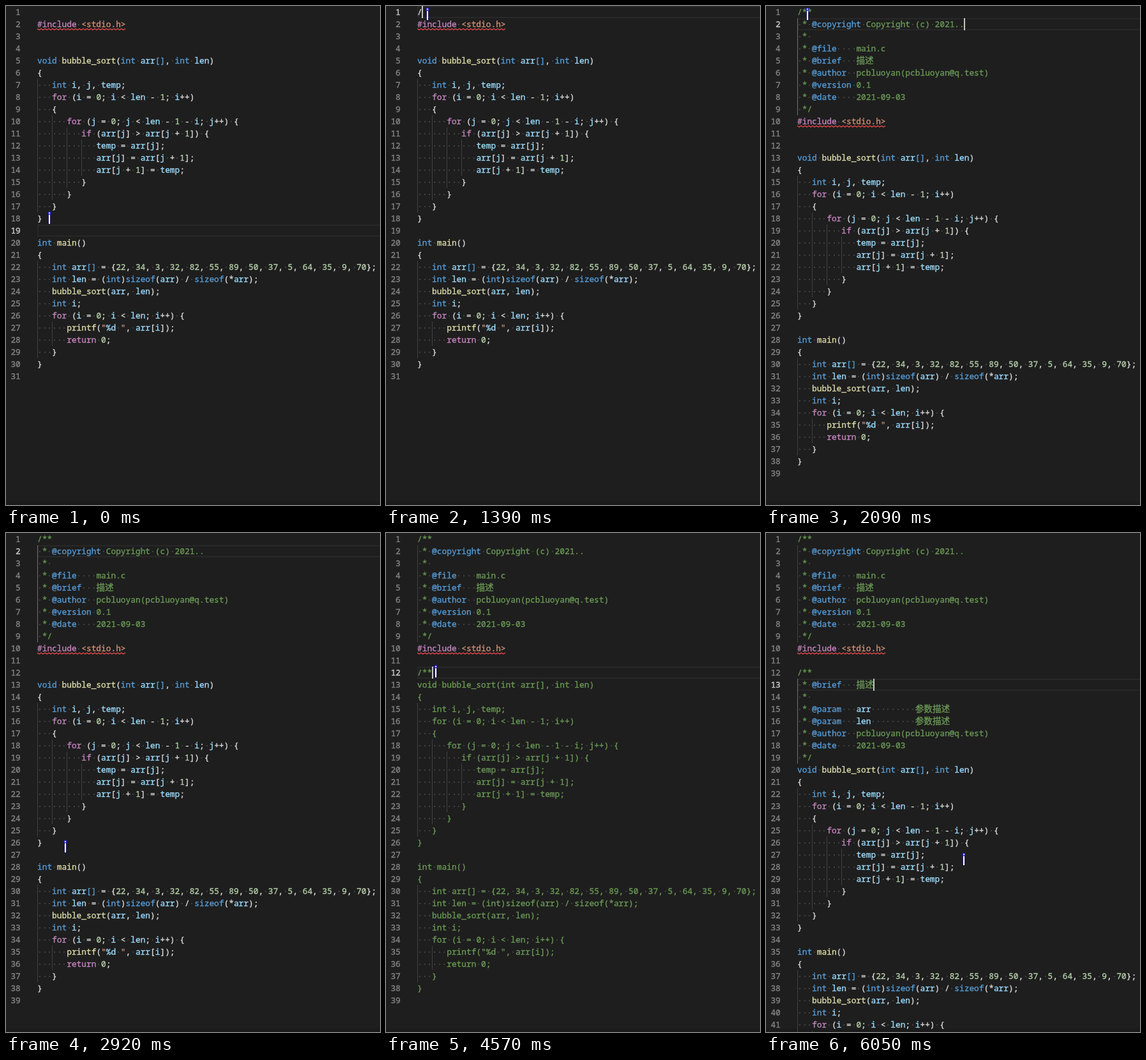
Recreate the animation shown at these times as an HTML page with a canvas. Size 586 by 781 pixels, loop 6510 ms.

```html
<!DOCTYPE html>
<html lang="en">
<head>
<meta charset="utf-8">
<title>Comment generator demo</title>
<style>
  html, body { margin: 0; width: 100%; height: 100%; overflow: hidden; background: #1e1e1e; }
  canvas { display: block; }
</style>
</head>
<body>
<canvas id="stage" width="586" height="781"></canvas>
<script>
const ctx = document.getElementById('stage').getContext('2d');
const W = 586, H = 781, LOOP = 6510;
const LEFT = 49, ROW = 19, CW = 7.698, BASE = 14, HAN_SIZE = 13.6;
const MONO = '12.83px "Noto Sans Mono", "DejaVu Sans Mono", monospace';
const HAN = HAN_SIZE + 'px "Noto Sans CJK SC", "Noto Sans CJK JP", sans-serif';
const BLINK_ON = 465, BLINK = 1000;

const C = {
  bg: '#1e1e1e', text: '#d9d9d9', key: '#569cd6', flow: '#c586c0', func: '#dcdcaa',
  name: '#9cdcfe', num: '#b5cea8', str: '#ce9178', note: '#6a9955',
  dot: '#404040', guide: '#404040', guideOn: '#707070', line: '#282828',
  no: '#858585', noOn: '#d0d0d0', caret: '#c4c5c3', error: '#f14c4c'
};

const BODY = `void bubble_sort(int arr[], int len)
{
   int i, j, temp;
   for (i = 0; i < len - 1; i++)
   {
      for (j = 0; j < len - 1 - i; j++) {
         if (arr[j] > arr[j + 1]) {
            temp = arr[j];
            arr[j] = arr[j + 1];
            arr[j + 1] = temp;
         }
      }
   }
}

int main()
{
   int arr[] = {22, 34, 3, 32, 82, 55, 89, 50, 37, 5, 64, 35, 9, 70};
   int len = (int)sizeof(arr) / sizeof(*arr);
   bubble_sort(arr, len);
   int i;
   for (i = 0; i < len; i++) {
      printf("%d ", arr[i]);
      return 0;
   }
}
`.split('\n');

const AUTHOR = 'pcbluoyan(pcbluoyan@q.test)';

// Two comments: click a row, type "/**", press enter, then the template expands.
// The code below takes the tint while the comment is still open.
const fileNote = {
  row: 0, click: 850, keys: [1390, 1620, 1770, 2000, 2090], tint: 'named',
  doc: `/**
 * @copyright Copyright (c) 2021..
 * 
 * @file    main.c
 * @brief   描述
 * @author  ${AUTHOR}
 * @version 0.1
 * @date    2021-09-03
 */`.split('\n')
};
const funcNote = {
  row: 11, click: 3620, keys: [4330, 4480, 4560, 4950, 5040], tint: 'note',
  doc: `/**
 * @brief   描述
 * 
 * @param   arr         参数描述
 * @param   len         参数描述
 * @author  ${AUTHOR}
 * @date    2021-09-03
 */`.split('\n')
};

// Stops of the pointer: time, x, y
const STOPS = [
  [0, 68, 324], [250, 26, 468], [620, 67, 7], [930, 65, 5], [2570, 65, 5],
  [2930, 93, 484], [3390, 78, 209], [5760, 78, 209], [6050, 310, 503]
];

const stage = (note, t) => note.keys.filter(k => k <= t).length;
const isOpen = (note, t) => stage(note, t) > 1 && stage(note, t) < 5;
const isHan = ch => ch >= '\u4e00' && ch <= '\u9fff';
const columns = s => [...s].reduce((n, ch) => n + (isHan(ch) ? HAN_SIZE / CW : 1), 0);
const indent = s => s.search(/\S|$/);
const rows = (texts, mode) => texts.map(text => ({ text, mode }));

function noteRows(note, t) {
  const n = stage(note, t);
  if (n === 5) return rows(note.doc, 'doc');
  const top = rows(['/**'.slice(0, n)], n > 1 ? 'doc' : 'plain');
  return n === 4 ? [...top, ...rows([' * '], 'plain')] : top;
}

function page(t) {
  const upper = isOpen(fileNote, t) ? fileNote.tint : 'code';
  const lower = isOpen(funcNote, t) ? funcNote.tint : upper;
  return [
    ...noteRows(fileNote, t),
    ...rows(['#include <stdio.h>', ''], upper),
    ...noteRows(funcNote, t),
    ...rows(BODY, lower)
  ];
}

// Each click or key restarts the blinking.
function caretAt(t) {
  if (t < fileNote.click) return { row: 18, col: 0, on: t > BLINK_ON };
  const note = t < funcNote.click ? fileNote : funcNote;
  const n = stage(note, t);
  const since = t - [note.click, ...note.keys][n];
  return {
    row: note.row + (n > 3 ? 1 : 0),
    col: n === 5 ? columns(note.doc[1]) : Math.min(n, 3),
    on: since % BLINK < BLINK_ON
  };
}

function mouseAt(t) {
  const next = STOPS.findIndex(s => s[0] > t);
  if (next < 0) return STOPS[STOPS.length - 1].slice(1);
  const [t0, x0, y0] = STOPS[next - 1], [t1, x1, y1] = STOPS[next];
  const u = (t - t0) / (t1 - t0), e = u * u * (3 - 2 * u);
  return [x0 + (x1 - x0) * e, y0 + (y1 - y0) * e];
}

const TOKEN = /#include|<stdio\.h>|"|%d|\[\]|[A-Za-z_]\w*|\d+|\S/g;
const DOC_TOKEN = /[\u4e00-\u9fff]+|[^\s\u4e00-\u9fff]+/g;

function codeColor(s) {
  if (/^(#include|for|if|return)$/.test(s)) return C.flow;
  if (/^(void|int|sizeof|\[\])$/.test(s)) return C.key;
  if (/^(bubble_sort|main|printf)$/.test(s)) return C.func;
  if (/^(<stdio\.h>|")$/.test(s)) return C.str;
  if (/^\d/.test(s)) return C.num;
  return /^(%d|\w+)$/.test(s) ? C.name : C.text;
}

function docColor(s) {
  if (s[0] === '@') return C.key;
  return /^(arr|len)$/.test(s) ? C.name : C.note;
}

function namedColor(s) {
  const c = codeColor(s);
  return s !== '%d' && (c === C.name || c === C.func) ? c : C.note;
}

const PAINT = {
  code: codeColor, doc: docColor, named: namedColor,
  note: () => C.note, plain: () => C.text
};

function rect(x, y, w, h, color) {
  ctx.fillStyle = color;
  ctx.fillRect(x, y, w, h);
}

function disc(x, y, r, color) {
  ctx.fillStyle = color;
  ctx.beginPath();
  ctx.arc(x, y, r, 0, Math.PI * 2);
  ctx.fill();
}

// A hairline outline gives the small type its full brightness.
function write(s, x, y, color, font = MONO) {
  ctx.font = font;
  ctx.fillStyle = ctx.strokeStyle = color;
  ctx.lineWidth = 0.35;
  ctx.fillText(s, x, y);
  ctx.strokeText(s, x, y);
}

function squiggle(y, width) {
  ctx.strokeStyle = C.error;
  ctx.lineWidth = 1.2;
  ctx.beginPath();
  for (let x = 0; x <= width; x += 3) ctx.lineTo(LEFT + x, y + (x % 6 ? 2.5 : 0.5));
  ctx.stroke();
}

function drawRow({ text, mode }, i, active, lit) {
  const y = i * ROW;
  ctx.textAlign = 'right';
  write(i + 1, 22.8, y + BASE, i === active ? C.noOn : C.no);
  ctx.textAlign = 'left';

  for (let g = 0; g < indent(text); g += 3) {
    rect(Math.floor(LEFT + g * CW), y, 1, ROW, lit && g === 0 ? C.guideOn : C.guide);
  }
  [...text].forEach((ch, col) => {
    if (ch === ' ') rect(Math.round(LEFT + (col + 0.5) * CW - 1), y + 9, 2, 2, C.dot);
  });
  for (const m of text.matchAll(mode === 'doc' ? DOC_TOKEN : TOKEN)) {
    const s = m[0];
    write(s, LEFT + m.index * CW, y + BASE, PAINT[mode](s), isHan(s[0]) ? HAN : MONO);
  }
  if (text[0] === '#') squiggle(y + 16, text.length * CW);
}

function drawMouse(x, y) {
  rect(x - 2, y + 2, 4, 15, 'rgba(30, 30, 190, 0.4)');
  rect(x - 1, y + 2, 2, 15, '#ffffff');
  disc(x, y, 2.6, '#1c1cc8');
  disc(x, y, 1.3, '#c8c8ff');
}

function draw(t) {
  rect(0, 0, W, H, C.bg);
  rect(0, 776, W, 5, '#1b1b1b');

  const lines = page(t);
  const caret = caretAt(t), active = caret.row;
  ctx.strokeStyle = C.line;
  ctx.lineWidth = 2;
  ctx.strokeRect(LEFT + 1, active * ROW + 1, W, ROW - 2);

  // The block of indented rows around the caret has a brighter guide.
  const inside = i => lines[i] && indent(lines[i].text) > 0;
  let from = active, to = active;
  while (inside(from)) from--;
  while (inside(to)) to++;

  lines.forEach((row, i) => {
    if (i * ROW < H) drawRow(row, i, active, i > from && i < to);
  });

  if (caret.on) rect(Math.floor(LEFT + caret.col * CW), active * ROW, 2, ROW, C.caret);
  drawMouse(...mouseAt(t).map(Math.round));
}

const start = performance.now();
function tick() {
  draw((performance.now() - start) % LOOP);
  requestAnimationFrame(tick);
}
tick();
</script>
</body>
</html>
```
